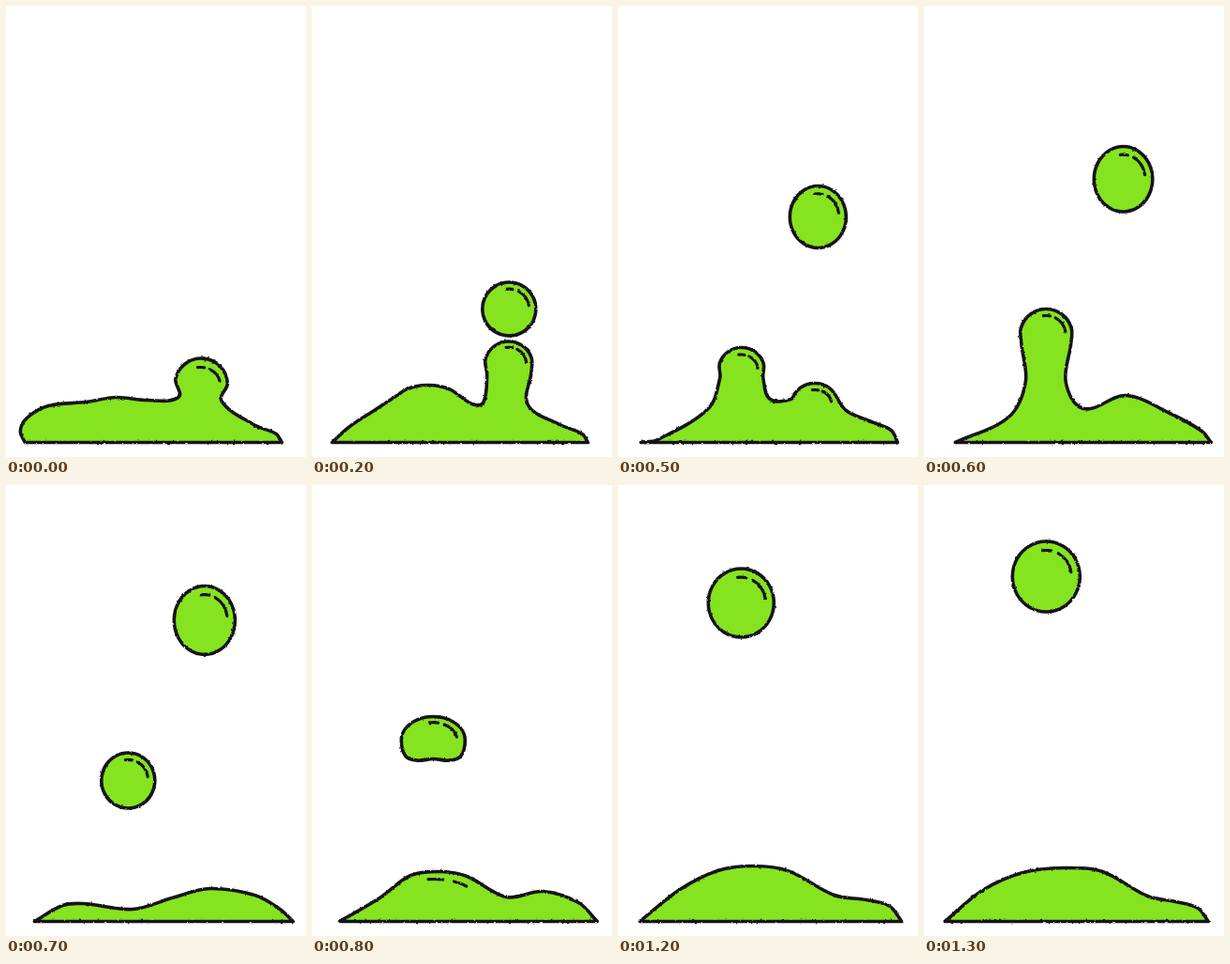
Write an HTML page that moves like this. It is 320 px wide and 480 px high and loops after 1400 ms.

```html
<!DOCTYPE html>
<html lang="en">
<head>
<meta charset="utf-8">
<title>Slime</title>
<style>
  html, body { margin: 0; width: 100%; height: 100%; overflow: hidden; background: #fff; }
  svg { display: block; width: 320px; height: 480px; }
  path { stroke: #17131b; stroke-width: 3.6; stroke-linejoin: round; stroke-linecap: round; fill: #85e41f; }
  #shine { fill: none; stroke-width: 3.2; }
</style>
</head>
<body>
<svg viewBox="0 0 320 480">
  <filter id="rough" filterUnits="userSpaceOnUse" x="0" y="0" width="320" height="480" color-interpolation-filters="sRGB">
    <feTurbulence id="noise" type="fractalNoise" baseFrequency=".28" numOctaves="2" result="n"/>
    <feDisplacementMap in="SourceGraphic" in2="n" scale="2.4" xChannelSelector="R" yChannelSelector="G"/>
  </filter>
  <g filter="url(#rough)">
    <g transform="translate(.3 .5)">
      <path id="mound"/>
      <path id="balls"/>
      <path id="shine"/>
    </g>
  </g>
</svg>
<script>
const STEP = 100, STEPS = 14;
const $ = id => document.getElementById(id);

// Point on an ellipse, angle in degrees, -90 is the top
const polar = (x, y, rx, ry, deg) => {
  const a = deg * Math.PI / 180;
  return [x + rx * Math.cos(a), y + ry * Math.sin(a)];
};

// Top of a bulge, from its left side over to its right side
const dome = (x, y, rx, ry, from, to) =>
  Array.from({ length: 7 }, (_, i) => polar(x, y, rx, ry, from + (to - from) * i / 6));

// Ellipse whose underside gets boxy and hollow as dent grows
const ball = ([x, y, rx, ry, dent]) => Array.from({ length: 12 }, (_, i) => {
  let [c, s] = polar(0, 0, 1, 1, 180 + i * 30);
  if (s > 0) s = s ** (1 - .45 * dent) * (1 - .2 * dent * s ** 8);
  return [x + rx * c, y + ry * s];
});

// Smooth curve through points, handles scaled to segment length
function curve(p, closed) {
  const n = p.length;
  const at = i => closed ? p[(i + n) % n] : p[Math.max(0, Math.min(n - 1, i))];
  const dir = i => {
    const a = at(i - 1), b = at(i + 1);
    const d = Math.hypot(b[0] - a[0], b[1] - a[1]) || 1;
    return [(b[0] - a[0]) / d, (b[1] - a[1]) / d];
  };
  let d = 'M' + p[0];
  for (let i = 0; i < (closed ? n : n - 1); i++) {
    const a = at(i), b = at(i + 1), u = dir(i), v = dir(i + 1);
    const h = Math.hypot(b[0] - a[0], b[1] - a[1]) / 3;
    d += `C${a[0] + u[0] * h},${a[1] + u[1] * h} ${b[0] - v[0] * h},${b[1] - v[1] * h} ${b}`;
  }
  return d + 'Z';
}

// Two dashes on an inner ring of a bulge or ball
function gloss(x, y, rx, ry, end = -10) {
  const arc = (from, to) =>
    `M${polar(x, y, rx * .75, ry * .75, from)}A${rx * .75},${ry * .75} 0 0 1 ${polar(x, y, rx * .75, ry * .75, to)}`;
  return arc(-98, -78) + arc(-62, end);
}

// Blend nested numbers; parts missing on one side drop out
const mix = (a, b, k) => Array.isArray(a)
  ? a.slice(0, b.length).map((v, i) => mix(v, b[i], k))
  : a + (b - a) * k;

// Value of a keyed track at a step, or nothing outside its span
function at(track, step) {
  const keys = Object.keys(track).map(Number);
  const lo = keys.filter(k => k <= step).pop();
  const hi = keys.find(k => k >= step);
  if (lo === undefined || hi === undefined) return null;
  return lo === hi ? track[lo] : mix(track[lo], track[hi], (step - lo) / (hi - lo));
}

// Each key: outline knots, then the bulges that shine
const tail = [[230, 424], [264, 445], [288, 455], [294, 464]];
const mound = {
  0: [[[20, 464], [15, 452], [22, 438], [45, 425], [85, 421], [117, 416], [150, 419],
    ...dome(208, 402, 28, 27.5, -210, 40), ...tail.slice(1)],
    [[207, 402, 28, 24]]],
  1: [[[18, 464], [30, 447], [60, 431], ...dome(120, 432, 40, 18, -150, -30), [170, 423], [181, 420],
    ...dome(209, 366, 28, 28, -205, 20), ...tail],
    [[209, 366, 28, 28]]],
  3: [[[24, 464], [50, 447], [75, 427], ...dome(127, 416, 35, 24, -150, -30), [173, 424], [184, 423],
    ...dome(210, 397, 23, 22, -205, 20), ...tail],
    [[210, 397, 23, 22, -10], [125, 416, 35, 24, -40]]],
  5: [[[24, 464], [42, 461], [96, 428], ...dome(131.5, 387, 24.5, 24, -200, 20), [162, 418], [184, 418],
    ...dome(209.5, 422, 24, 21, -150, -30), [243, 430], [270, 442], [291, 451], [298, 464]],
    [[209.5, 423, 24, 20, -10], [131, 387, 24, 22, -8]]],
  6: [[[33, 464], [90, 437], [108, 400], ...dome(130, 350, 28, 28, -200, 20), [151, 400], [170, 428],
    [215, 414], [262, 433], [296, 452], [306, 464]],
    [[130, 350, 28, 28]]],
  7: [[[30, 464], [60, 447], [82, 445], [135, 451], [180, 438], [217, 429], [265, 436], [292, 451], [306, 464]], []],
  8: [[[29, 464], [72, 439], [105, 415], [138, 411], [165, 416], [207, 438], [246, 432], [284, 444], [304, 464]],
    [[130, 440, 60, 28, -40]]],
  10: [[[25, 464], [72, 429], [108, 406], [138, 401], [165, 409], [215, 434], [258, 437], [284, 443], [301, 464]],
    [[134, 442, 55, 44, -45]]],
  13: [[[22, 464], [62, 431], [105, 412], [148, 407], [190, 411], [238, 437], [268, 443], [292, 450], [303, 464]], []]
};

// Ball keys: x, y, rx, ry, dent
const first = { 2: [210, 322, 28.5, 28.5, 0], 5: [213, 224, 30, 33, 0], 7: [211.5, 143.5, 32.5, 36.5, 0] };
const second = {
  7: [130, 314, 28.5, 29.5, 0], 8: [129, 271, 34, 25, 1], 10: [132, 193, 35, 30, 1],
  12: [131, 125, 35, 36.5, 0], 13: [130, 97, 36, 37.5, 0]
};

let shown = -1;
function draw(step) {
  if (step === shown) return;
  shown = step;
  const [knots, bulges] = at(mound, step);
  const balls = [first, second].map(t => at(t, step)).filter(Boolean);
  $('mound').setAttribute('d', curve(knots));
  $('balls').setAttribute('d', balls.map(b => curve(ball(b), true)).join(''));
  $('shine').setAttribute('d', [...bulges, ...balls.map(b => b.slice(0, 4))].map(g => gloss(...g)).join(''));
  $('noise').setAttribute('seed', step + 1);
}

const start = performance.now();
function tick() {
  draw(Math.floor((performance.now() - start) / STEP) % STEPS);
  requestAnimationFrame(tick);
}
tick();
</script>
</body>
</html>
```
